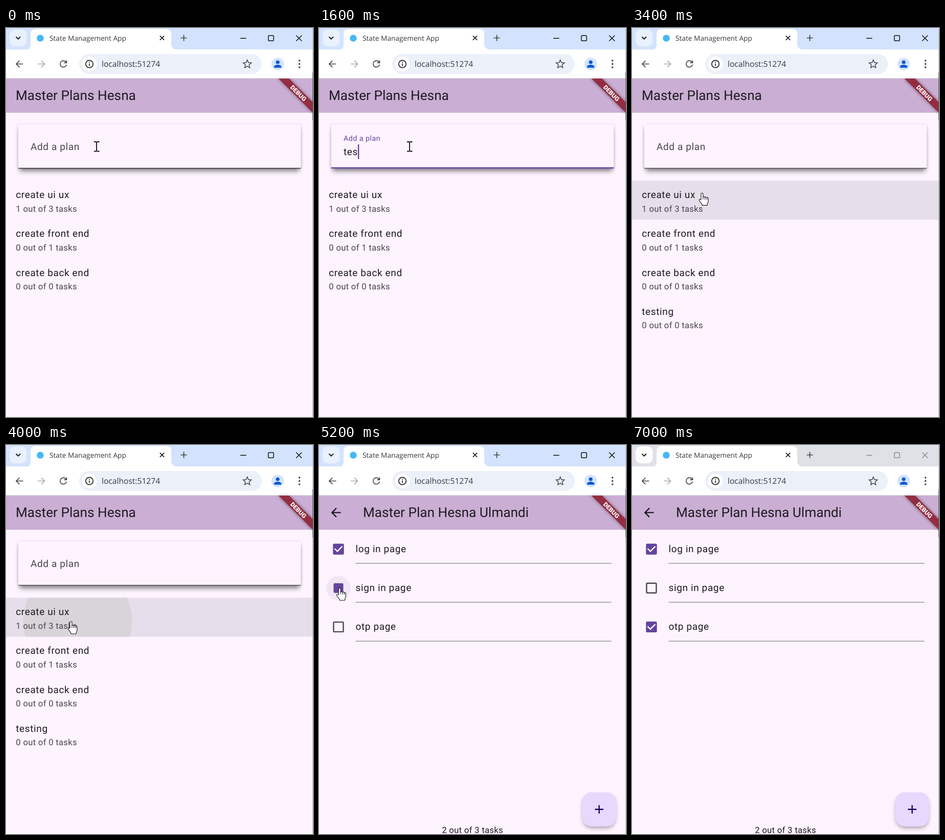
Recreate the animation shown at these times as an HTML page. Size 600x762 px, loop 7100 ms.

```html
<!DOCTYPE html>
<html lang="en">
<head>
<meta charset="utf-8">
<title>State Management App</title>
<style>
  html, body { margin: 0; width: 100%; height: 100%; overflow: hidden; background: #fef4ff; }
  svg { display: block; width: 100%; height: 100%; }
  text { font-family: Roboto, sans-serif; fill: #1d1b20; white-space: pre; text-rendering: geometricPrecision; }
  .bar { font-size: 26.2px; }
  .big { font-size: 19.05px; letter-spacing: .6px; }
  .small { font-size: 16.67px; letter-spacing: .3px; }
  .soft { fill: #49454f; }
  .chrome { font-family: "Open Sans", "Noto Sans", sans-serif; fill: #36373a; }
  .line { fill: none; stroke: #1f1f1f; stroke-width: 1.7; }
  .cursor { fill: #fff; stroke: #111; stroke-width: 1.1; stroke-linejoin: round; }
</style>
</head>
<body>
<svg id="stage" viewBox="0 0 600 762"></svg>
<script>
const LOOP = 7100, STEP = 100, ROW = 76.2;
const BG = '#fef4ff', BAR = '#cbaed4', INK = '#1d1b20', SOFT = '#49454f', RULE = '#6b6771', MAIN = '#65439f';
const FOCUS = 200, TYPE = 1100, KEY = 170, SUBMIT = 2700, TAP = 3900, OPEN = 4100;
const CHECK = 5100, UNCHECK = 5500, CHECK_LAST = 6400, BLUR = 6900;
const WORD = 'testing';

const plans = [['create ui ux', '1 out of 3 tasks'], ['create front end', '0 out of 1 tasks'],
  ['create back end', '0 out of 0 tasks'], [WORD, '0 out of 0 tasks']];
const tasks = ['log in page', 'sign in page', 'otp page'];

const clamp = v => Math.max(0, Math.min(1, v));
const ease = v => { v = clamp(v); return v * v * (3 - 2 * v); };
const mix = (a, b, p) => a + (b - a) * p;
const label = (x, y, cls, str, more = '') => `<text x="${x}" y="${y}" class="${cls}" ${more}>${str}</text>`;
const rect = (x, y, w, h, fill, more = '') =>
  `<rect x="${x}" y="${y}" width="${w}" height="${h}" fill="${fill}" ${more}/>`;
const line = (d, more = '') => `<path class="line" d="${d}" ${more}/>`;

const planRow = ([name, count], i) => `<g id="plan${i}">
  ${label(19.3, 333.2 + i * ROW, 'big', name)}${label(19.3, 359.6 + i * ROW, 'small soft', count)}</g>`;

const taskRow = (name, i) => `<g transform="translate(0 ${204 + i * ROW})">
  <circle id="halo${i}" cx="38" r="23.8"/>
  <rect id="box${i}" rx="1.4" fill="${MAIN}" stroke-width="2.4"/>
  <path id="tick${i}" d="M30.5 -1L35.9 4.3L45.5 -5.3" fill="none" stroke="#fff" stroke-width="2.4"
    pathLength="1" stroke-dasharray="1 2"/>
  ${label(71.6, 6, 'big', name)}
  ${rect(71.5, 27.3, 500, 1, RULE, `id="rule${i}"`)}</g>`;

const listPage = `<g id="list">
  ${rect(0, 99, 600, 663, BG)}${rect(0, 99, 600, 67, BAR)}
  ${label(19, 141.3, 'bar', 'Master Plans Hesna')}
  ${rect(24, 190, 552, 86, '#000', 'opacity=".16" filter="url(#blur3)"')}
  ${rect(27, 198, 546, 83, '#000', 'opacity=".42" filter="url(#blur5)"')}
  ${rect(24, 189, 552, 86, BG)}
  <rect id="under" x="24" width="552"/>
  <text id="hint" x="48">Add a plan</text>
  ${label(48, 248.5, 'big', '', 'id="typed"')}
  ${rect(0, 228, 2.4, 28.5, MAIN, 'id="caret"')}
  <rect id="hover" width="600" height="76.2" fill="#e6deea"/>
  <circle id="ripple" fill="#d9d4da" clip-path="url(#firstRow)"/>
  ${plans.map(planRow).join('')}</g>`;

const detailPage = `<g id="detail">
  ${rect(0, 99, 600, 663, BG)}${rect(0, 99, 600, 67, BAR)}
  <path d="M20 11H7.83L13.42 5.41L12 4L4 12L12 20L13.41 18.59L7.83 13H20Z" fill="${INK}"
    transform="translate(18.9 118.1) scale(1.19)"/>
  ${label(86, 141.3, 'bar', 'Master Plan Hesna Ulmandi')}
  ${tasks.map(taskRow).join('')}
  ${label(300, 760.4, 'small', '', 'id="count" text-anchor="middle"')}
  ${rect(516, 686, 63, 64, '#000', 'rx="18" opacity=".38" filter="url(#blur4)"')}
  ${rect(514.2, 680.4, 67, 66.8, '#e7d8fd', 'rx="19"')}
  ${line('M539.2 713.7H555.8M547.5 705.4V722', 'style="stroke:#21005d;stroke-width:2.4"')}</g>`;

const banner = `<g transform="translate(600 99) rotate(45)">
  ${rect(-47.6, 33.3, 95.2, 14.3, '#000', 'opacity=".5" filter="url(#blur3)"')}
  ${rect(-47.6, 33.3, 95.2, 14.3, '#942d41')}
  ${label(0, 44.8, '', 'DEBUG', 'text-anchor="middle" style="font-size:12.1px;font-weight:900;fill:#fff"')}</g>`;

const browser = `${rect(0, 0, 600, 43, '#d3e3fd', 'id="strip"')}
  ${rect(0, 42, 600, 57, '#fff')}${rect(0, 98, 600, 1, '#dddce2')}
  <path d="M38 43C45 43 48 39 48 33V12Q48 2 58 2H313Q323 2 323 12V33Q323 39 333 43Z" fill="#fff"/>
  ${rect(7, 3, 33.5, 33, '#e9f0fe', 'id="menu" rx="10"')}
  ${line('M19.5 17.2L23.8 21.5L28.1 17.2', 'style="stroke-width:2"')}
  <circle cx="67" cy="20" r="6.8" fill="#47b8f5"/>
  ${label(85, 25.2, 'chrome', 'State Management App', 'style="font-size:13.7px"')}
  ${line('M300.8 15.3L309.2 23.7M309.2 15.3L300.8 23.7')}
  ${line('M341.5 19.5H353.5M347.5 13.5V25.5', 'style="stroke:#444"')}
  <g id="buttons" fill="none" stroke-width="1.5"><path d="M458 20.2H469.5"/>
    <rect x="512.7" y="14.7" width="10.3" height="10.3" rx="1.8"/>
    <path d="M567 14.5L578 25.5M578 14.5L567 25.5"/></g>
  ${line('M33.5 70.5H20.5M26.3 64.2L20 70.5L26.3 76.8', 'style="stroke:#444"')}
  ${line('M62 70.5H75M69.2 64.2L75.5 70.5L69.2 76.8', 'style="stroke:#aaa"')}
  ${line('M117.6 67.2A6.3 6.3 0 1 0 118.3 71.7M118.4 63.4V68.2H113.5', 'style="stroke:#444"')}
  ${rect(143, 51, 357, 39, '#ecf0f9', 'rx="19.5"')}
  <circle cx="163" cy="70.5" r="14.2" fill="#fff"/>
  <circle cx="163" cy="70.5" r="7.2" class="line"/>
  ${line('M163 69.6V74.3M163 66.2V68')}
  ${label(187, 76, 'chrome', 'localhost:51274', 'style="font-size:15.6px"')}
  ${line('M471.5 62.6L473.8 67.8L479.5 68.4L475.2 72.2L476.4 77.8L471.5 74.9L466.6 77.8L467.8 72.2L463.5 68.4L469.2 67.8Z',
    'style="stroke:#444;stroke-width:1.5"')}
  <circle cx="531" cy="70.5" r="12.2" fill="#d3e3fd"/>
  <g fill="#0b57d0"><circle cx="531" cy="67" r="3.6"/>
    <path d="M523.8 77.8V76C523.8 73.2 528 72.1 531 72.1S538.2 73.2 538.2 76V77.8Z"/></g>
  ${[64, 70.5, 77].map(y => `<circle cx="573.5" cy="${y}" r="1.8" fill="#444"/>`).join('')}`;

const blur = n => `<filter id="blur${n}" x="-50%" y="-50%" width="200%" height="200%">
  <feGaussianBlur stdDeviation="${n}"/></filter>`;

document.getElementById('stage').innerHTML = `<defs>${[3, 4, 5].map(blur).join('')}
  <clipPath id="view"><rect y="99" width="600" height="663"/></clipPath>
  <clipPath id="firstRow"><rect y="299.3" width="600" height="76.2"/></clipPath></defs>
  <g clip-path="url(#view)">${listPage}${detailPage}${banner}</g>${browser}
  ${rect(599, 0, 1, 87, '#b9c4d6')}${rect(599, 87, 1, 94, '#5a5560')}${rect(599, 181, 1, 581, '#b5adba')}
  <g id="mouse">
    <path id="beam" d="M-5 -9H-1.6L0 -8L1.6 -9H5.5M0 -8V8.5M-5 9.5H-1.6L0 8.5L1.6 9.5H5.5"
      fill="none" stroke="#111" stroke-width="1.8"/>
    <path id="arrow" class="cursor" d="M0 0V17.5L4 13.8L6.7 20.6L9.6 19.4L6.8 12.8H12.6Z"/>
    <path id="hand" class="cursor" d="M-2 13V1.8a2 2 0 0 1 4 0V8a2 2 0 0 1 3.7 .5a2 2 0 0 1 3.5 .8
      a1.6 1.6 0 0 1 2.8 1.2V16c0 3-2 4-2 8H.5c-.5-3-3.5-5-6-9.5c-.8-1.6.8-3 2.3-1.8Z
      M2 8V12M5.7 8.8V12.5M9.2 9.8V13"/>
  </g>`;

const el = {};
document.querySelectorAll('[id]').forEach(n => el[n.id] = n);
const set = (id, attrs) => { for (const k in attrs) el[id].setAttribute(k, attrs[k]); };
const show = (id, on) => set(id, { visibility: on ? 'inherit' : 'hidden' });

// time, x, y of the pointer
const path = [[0, 177, 232], [2900, 177, 232], [3600, 127, 346], [4100, 127, 346], [4400, 50.5, 247.5],
  [4600, 50.5, 247.5], [5000, 40.3, 280.3], [5600, 40.3, 280.3], [6100, 41, 357], [6500, 41, 357], [6850, -30, 420]];

function pointer(t) {
  const i = path.findIndex(k => k[0] > t);
  if (i < 0) return path[path.length - 1].slice(1);
  const [t0, x0, y0] = path[i - 1], [t1, x1, y1] = path[i], p = ease((t - t0) / (t1 - t0));
  return [mix(x0, x1, p), mix(y0, y1, p)];
}

function drawList(t, x, y) {
  const focused = t >= FOCUS && t < SUBMIT;
  const lift = ease((t - FOCUS) / 167) - ease((t - SUBMIT) / 167);
  const over = x > 24 && x < 576 && y > 189 && y < 275;
  set('hint', { y: mix(238.6, 220.6, lift) });
  el.hint.style.cssText = `fill:${focused ? MAIN : SOFT};font-size:${mix(19.05, 14.3, lift)}px;` +
    `letter-spacing:${mix(.6, .45, lift)}px`;
  const thick = focused ? 2.4 : 1.2;
  set('under', { y: 275.2 - thick, height: thick, fill: focused ? MAIN : over ? INK : SOFT });

  const n = focused ? Math.max(0, Math.min(WORD.length, Math.floor((t - TYPE) / KEY) + 1)) : 0;
  el.typed.textContent = WORD.slice(0, n);
  const since = n ? t - TYPE - (n - 1) * KEY : t - FOCUS;
  show('caret', focused && since % 1000 < 500);
  set('caret', { x: 48 + (n ? el.typed.getComputedTextLength() : 0) });

  const row = Math.floor((y - 299.3) / ROW);
  show('hover', row >= 0 && row < 4);
  set('hover', { y: 299.3 + row * ROW });
  show('plan3', t >= SUBMIT);

  const p = clamp((t - TAP) / 365), grow = p * p;
  show('ripple', t >= TAP);
  set('ripple', { cx: mix(127, 300, grow), cy: mix(346, 337.4, grow), r: 302 * (.3 + .7 * grow) });
}

function drawDetail(t, x, y) {
  const done = [1, clamp((t - CHECK) / 200) - clamp((t - UNCHECK) / 200), clamp((t - CHECK_LAST) / 200)];
  done.forEach((s, i) => {
    const near = Math.abs(x - 38) < 30 && Math.abs(y - 204 - i * ROW) < 34;
    // the box shrinks a little halfway through a toggle
    const half = 9.5 - 1.19 * (1 - Math.abs(s - .5) * 2);
    show('halo' + i, near);
    set('halo' + i, { fill: s > 0 ? '#f0e6f5' : '#e9e1ed' });
    set('box' + i, { x: 38 - half, y: -half, width: 2 * half, height: 2 * half,
      'fill-opacity': clamp(s * 2), stroke: s > 0 ? MAIN : near ? INK : SOFT });
    show('tick' + i, s > .5);
    set('tick' + i, { 'stroke-dashoffset': 1 - clamp(s * 2 - 1) });
    set('rule' + i, { fill: i === 1 && t < 4500 ? INK : RULE });
  });
  const total = 1 + (t >= CHECK && t < UNCHECK) + (t >= CHECK_LAST);
  el.count.textContent = total + ' out of 3 tasks';
}

const zoom = s => `translate(300 430) scale(${s}) translate(-300 -430)`;

function draw(t) {
  const [x, y] = pointer(t), open = clamp((t - OPEN + 60) / 300), out = 1 - (1 - open) ** 3;
  show('list', open < 1);
  show('detail', t >= OPEN);
  set('list', { transform: zoom(mix(1, 1.05, out)) });
  set('detail', { transform: zoom(mix(.85, 1, out)), opacity: clamp(open * 4) });
  if (open < 1) drawList(t, x, y);
  drawDetail(t, x, y);

  const active = t < BLUR;
  set('strip', { fill: active ? '#d3e3fd' : '#dee1e6' });
  set('menu', { fill: active ? '#e9f0fe' : '#fdfdfe' });
  set('buttons', { stroke: active ? '#111' : '#8b8d90' });

  const onBox = t >= OPEN && Math.abs(x - 38) < 30 && [0, 1, 2].some(i => Math.abs(y - 204 - i * ROW) < 30);
  const kind = t < OPEN ? (y < 275 ? 'beam' : y < 299 ? 'arrow' : 'hand')
    : onBox ? 'hand' : x > 72 && y < 394 ? 'beam' : 'arrow';
  for (const id of ['beam', 'arrow', 'hand']) show(id, id === kind);
  set('mouse', { transform: `translate(${x} ${y})` });
}

const start = performance.now();
function tick() {
  const t = (performance.now() - start) % LOOP;
  draw(Math.floor(t / STEP) * STEP);
  requestAnimationFrame(tick);
}
tick();
</script>
</body>
</html>
```
